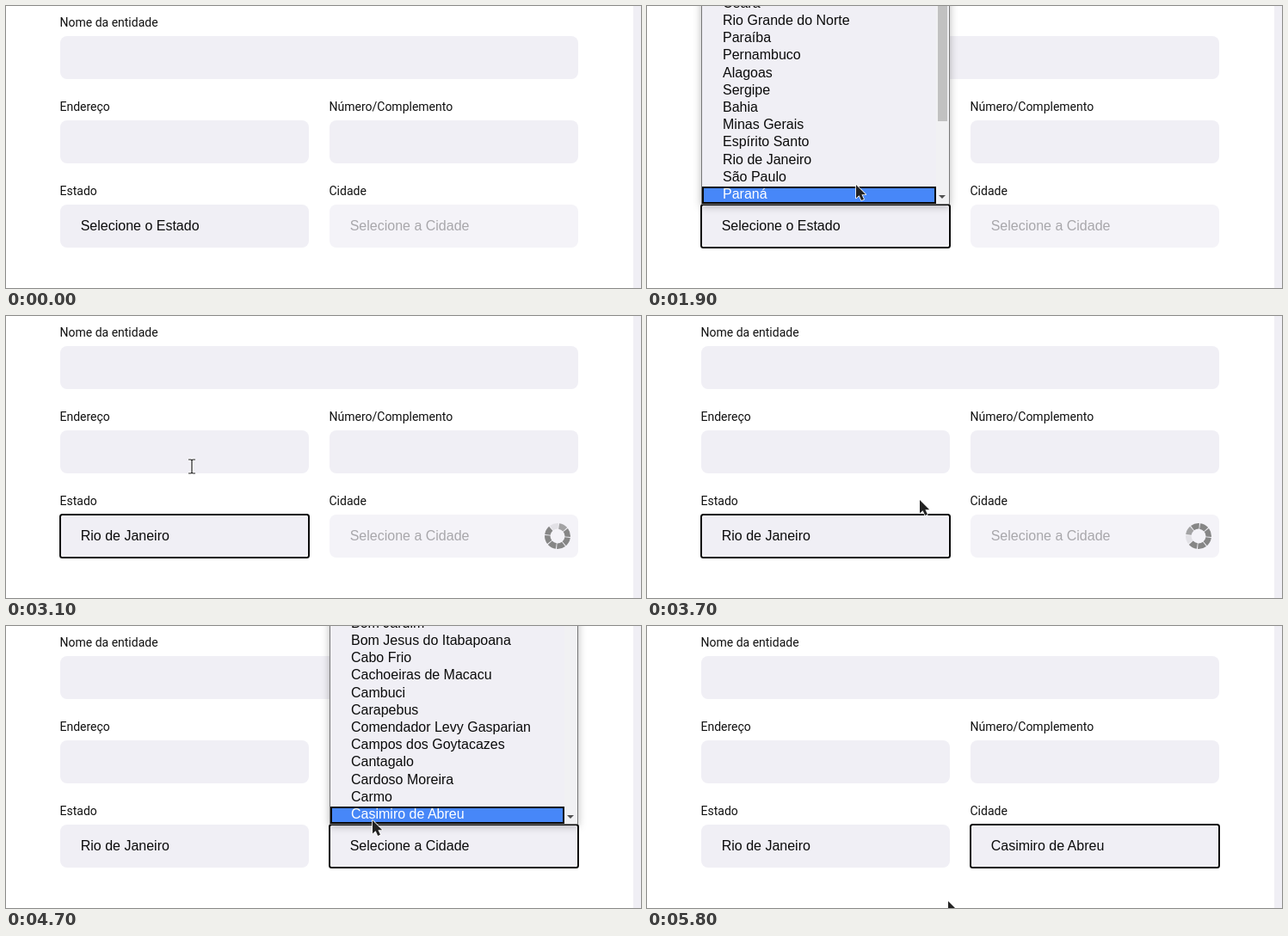
Recreate the animation shown at these times as an HTML page. Size 738 by 328 pixels, loop 6200 ms.

```html
<!DOCTYPE html>
<html lang="pt-BR">
<head>
<meta charset="utf-8">
<title>Cadastro de entidade</title>
<style>
  html, body { margin: 0; width: 100%; height: 100%; overflow: hidden; background: #fff; }
  svg { display: block; width: 738px; height: 328px; }
  text { font: 16px "Liberation Sans", Arial, sans-serif; fill: #0b0b0b; white-space: pre; }
  .label { font: 14px Roboto, sans-serif; fill: #111; }
  .field { fill: #f0eff5; }
  .off .field { fill: #f4f3f8; }
  .off text { fill: #a8a7ab; }
  .ring { fill: none; stroke: #0b0b0b; stroke-width: 2; }
  .popup { filter: drop-shadow(0 2px 5px rgba(0, 0, 0, .28)); }
  .sheet { fill: #f0eff5; stroke: #777; }
  .hover rect { fill: #4787f8; stroke: #0a0a0a; stroke-width: 2; }
  .popup text.on { fill: #fff; }
  .seg { fill: none; stroke: #808080; stroke-width: 6.5; stroke-dasharray: .9 7.1; }
</style>
</head>
<body>
<svg id="stage" viewBox="0 0 738 328">
  <rect x="729" width="9" height="328" fill="#f0eff5"/>
  <text class="label" x="62.5" y="24">Nome da entidade</text>
  <text class="label" x="62.5" y="122">Endereço</text>
  <text class="label" x="375.5" y="122">Número/Complemento</text>
  <text class="label" x="62.5" y="220">Estado</text>
  <text class="label" x="375.5" y="220">Cidade</text>
  <rect class="field" x="63" y="35" width="602" height="50" rx="8"/>
  <rect class="field" x="63" y="133" width="289" height="50" rx="8"/>
  <rect class="field" x="376" y="133" width="289" height="50" rx="8"/>
  <g id="selects"></g>
  <g id="spinner"></g>
  <g id="popups"></g>
  <g id="arrow">
    <path d="M0 0V15.5L3.6 12.2L6.2 18L9 16.8L6.4 11.2H11.2Z" fill="#222" stroke="#fff" stroke-width="1.6" stroke-linejoin="round" paint-order="stroke"/>
  </g>
  <g id="beam" fill="none">
    <path d="M-4 -8H-1L0 -7L1 -8H4M0 -7V7M-4 8H-1L0 7L1 8H4" stroke="#fff" stroke-width="3"/>
    <path d="M-4 -8H-1L0 -7L1 -8H4M0 -7V7M-4 8H-1L0 7L1 8H4" stroke="#222" stroke-width="1.2"/>
  </g>
</svg>
<script>
const LOOP = 6200, STEP = 100, ROW = 20.2;
const $ = id => document.getElementById(id);

function add(parent, tag, attrs, text) {
  const el = document.createElementNS("http://www.w3.org/2000/svg", tag);
  for (const k in attrs) el.setAttribute(k, attrs[k]);
  if (text) el.textContent = text;
  return parent.appendChild(el);
}
const show = (el, on) => { el.style.display = on ? "" : "none"; };

function makeSelect(x, options, thumbEnd) {
  const box = add($("selects"), "g", { transform: `translate(${x} 0)` });
  add(box, "rect", { class: "field", y: 231, width: 289, height: 50, rx: 8 });
  const value = add(box, "text", { x: 23.7, y: 261 });
  const ring = add(box, "rect", { class: "ring", y: 231, width: 289, height: 50, rx: 2.5 });

  const popup = add($("popups"), "g", { class: "popup", transform: `translate(${x} 0)` });
  add(popup, "rect", { class: "sheet", x: .5, y: -250.5, width: 288, height: 481 });
  add(popup, "rect", { x: 273, y: -250, width: 15, height: 480, fill: "#f1f1f3" });
  if (thumbEnd) add(popup, "rect", { x: 275, y: -250, width: 11, height: 250 + thumbEnd, fill: "#c1c1c1" });
  add(popup, "path", { d: "M276 220H284L280 224Z", fill: "#505050" });
  const hover = add(popup, "g", { class: "hover" });
  add(hover, "rect", { x: 2, y: 211, width: 270, height: 18 });
  const rows = options.split(",").reverse().map((name, k) =>
    add(popup, "text", { x: 25, y: Math.round(224 - ROW * k) }, name));
  return { box, value, ring, popup, hover, rows };
}

function draw(sel, text, focus, open, y) {
  sel.value.textContent = text;
  show(sel.ring, focus);
  show(sel.popup, open);
  if (!open) return;
  const k = y < 230 ? Math.max(0, Math.floor((230 - y) / ROW)) : -1;
  show(sel.hover, k >= 0);
  sel.hover.setAttribute("transform", `translate(0 ${-Math.round(ROW * k)})`);
  sel.rows.forEach((row, i) => row.classList.toggle("on", i === k));
}

const state = makeSelect(63, "Ceará,Rio Grande do Norte,Paraíba,Pernambuco,Alagoas,Sergipe,Bahia,Minas Gerais,Espírito Santo,Rio de Janeiro,São Paulo,Paraná", 134);
const city = makeSelect(376, "Bom Jardim,Bom Jesus do Itabapoana,Cabo Frio,Cachoeiras de Macacu,Cambuci,Carapebus,Comendador Levy Gasparian,Campos dos Goytacazes,Cantagalo,Cardoso Moreira,Carmo,Casimiro de Abreu");

for (let i = 0; i < 8; i++)
  add($("spinner"), "circle", {
    class: "seg", r: 11.7, pathLength: 8,
    transform: `rotate(${i * 45 - 82})`,
    opacity: i === 7 ? .15 : i === 0 ? .7 : .95
  });

// Pointer path: time, x, y
const path = [
  [300, 33, 222], [900, 150, 249], [1300, 267, 256], [1500, 267, 256],
  [1900, 243, 208], [2100, 236, 202], [2500, 222, 160], [2800, 216, 175],
  [3200, 216, 175], [4200, 417, 252], [4400, 417, 252], [4700, 426, 226],
  [5100, 428, 222], [5300, 428, 222], [5800, 350, 320]
];

function pointer(t) {
  const i = path.findIndex(p => p[0] > t);
  if (i < 0) return path[path.length - 1].slice(1);
  if (i === 0) return path[0].slice(1);
  const [a, b] = [path[i - 1], path[i]];
  const u = (t - a[0]) / (b[0] - a[0]), e = u * u * (3 - 2 * u);
  return [a[1] + (b[1] - a[1]) * e, a[2] + (b[2] - a[2]) * e];
}

const inInput = (x, y) =>
  (y > 35 && y < 85 && x > 63 && x < 665) ||
  (y > 133 && y < 183 && ((x > 63 && x < 352) || (x > 376 && x < 665)));

function render(now) {
  const t = Math.floor(now % LOOP / STEP) * STEP;
  const [x, y] = pointer(t).map(Math.round);
  const stateOpen = t >= 1500 && t < 3100;
  const cityOpen = t >= 4400 && t < 5300;
  const ready = t >= 3900;

  draw(state, t < 3100 ? "Selecione o Estado" : "Rio de Janeiro", t >= 1500 && t < 4400, stateOpen, y + 2);
  draw(city, t < 5300 ? "Selecione a Cidade" : "Casimiro de Abreu", t >= 4400, cityOpen, y + 2);
  city.box.classList.toggle("off", !ready);

  show($("spinner"), t >= 3100 && !ready);
  $("spinner").setAttribute("transform", `translate(641 256) rotate(${(t - 3100) / STEP * 45})`);

  const beam = !stateOpen && !cityOpen && inInput(x, y);
  show($("arrow"), t >= 300 && !beam);
  show($("beam"), t >= 300 && beam);
  for (const id of ["arrow", "beam"]) $(id).setAttribute("transform", `translate(${x} ${y})`);
}

const start = performance.now();
function tick() {
  render(performance.now() - start);
  requestAnimationFrame(tick);
}
tick();
</script>
</body>
</html>
```
